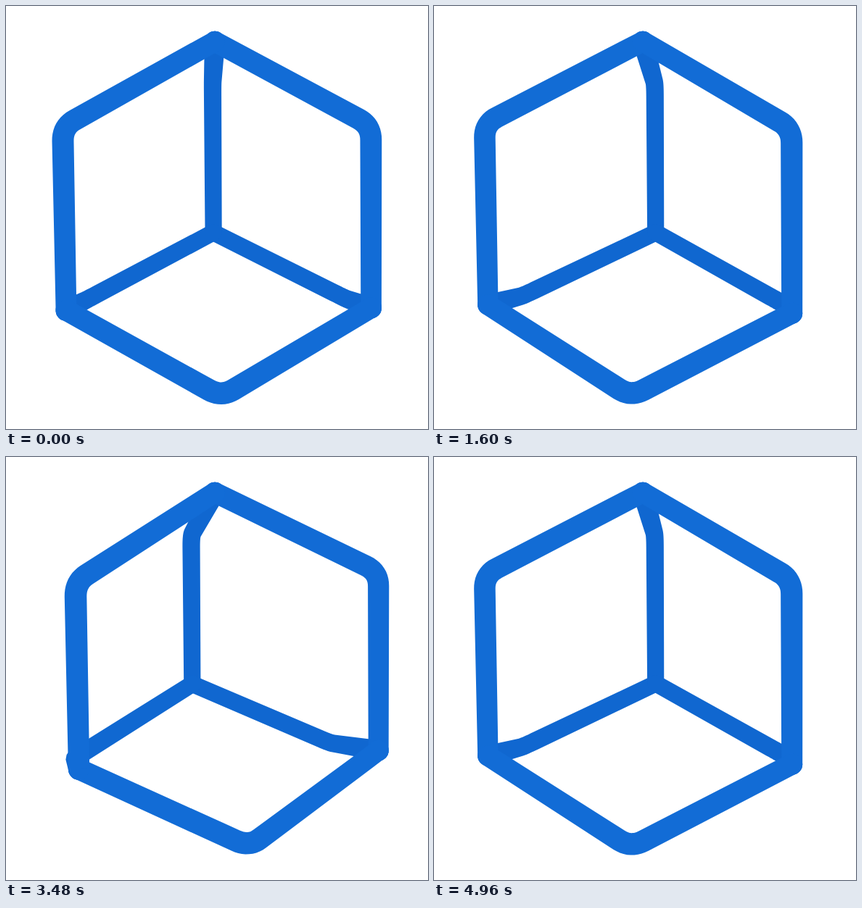
Recreate the animation shown at these times as an HTML page. Size 582 by 584 pixels, loop 5 s.

```html
<!DOCTYPE html>
<html lang="en">
<head>
<meta charset="utf-8">
<title>Rotating frame</title>
<style>
  html, body { margin: 0; width: 100%; height: 100%; overflow: hidden; background: #fff; }
  svg { display: block; width: 100vw; height: 100vh; }
</style>
</head>
<body>
<svg id="stage" viewBox="0 0 582 584"></svg>
<script>
const LOOP = 5000, STEP = 40, TURN = 360 / 126, PHASE = 1.3;   // degrees
const CX = 288, CY = 292, DIST = 1478, TILT = 16.1 * Math.PI / 180;
const SIN = Math.sin(TILT), COS = Math.cos(TILT);
const TOP = 241.5, LEAN = 0.009;   // the axis leans a little to the right below the apex
const RADIUS = 13.5, CUT = 18;

// Three points at equal angles, from the first angle, distance from the axis and height.
const ring = (deg, r, y) => [0, 120, 240].map(k => {
  const a = (deg + k) * Math.PI / 180;
  return [r * Math.cos(a), y, -r * Math.sin(a)];
});

const toward = (p, q, dist) => {
  const k = dist / Math.hypot(q[0] - p[0], q[1] - p[1], q[2] - p[2]);
  return p.map((v, i) => v + (q[i] - v) * k);
};

// Polyline from a to c with a rounded bend at b.
function bend(a, b, c) {
  const s = toward(b, a, CUT), e = toward(b, c, CUT), pts = [a];
  for (let i = 0; i <= 10; i++) {
    const t = i / 10, u = 1 - t;
    pts.push(b.map((v, j) => u * u * s[j] + 2 * u * t * v + t * t * e[j]));
  }
  pts.push(c);
  return pts;
}

const apex = [0, TOP, 0];
const shoulders = ring(89.8, 221, 150);
const feet = ring(90, 229, -91);
const corners = ring(149.8, 227, -162);

const stage = document.getElementById("stage");
const tubes = [];
for (let i = 0; i < 3; i++) {
  tubes.push(bend(apex, shoulders[i], feet[i]));
  tubes.push(bend(feet[i], corners[i], feet[(i + 1) % 3]));
}
const paths = tubes.map(() =>
  stage.appendChild(document.createElementNS("http://www.w3.org/2000/svg", "path")));

function project([x, y, z], c, s) {
  const px = x * c + z * s + (TOP - y) * LEAN, pz = z * c - x * s;
  const w = 1 - (pz * COS + y * SIN) / DIST;
  return { x: CX + px / w, y: CY + (pz * SIN - y * COS) / w, r: RADIUS / w, w };
}

const n2 = v => v.toFixed(2);

function disc({ x, y, r }) {
  const R = n2(r), d = n2(2 * r);
  return `M${n2(x - r)} ${n2(y)}a${R} ${R} 0 1 0 ${d} 0a${R} ${R} 0 1 0 -${d} 0z`;
}

// Closed outline around a projected polyline, with round ends.
function outline(pts) {
  const side = k => pts.map((p, i) => {
    const a = pts[Math.max(i - 1, 0)], b = pts[Math.min(i + 1, pts.length - 1)];
    const u = unit(a, p), v = unit(p, b);
    const tx = u[0] + v[0], ty = u[1] + v[1], len = Math.hypot(tx, ty) || 1;
    return n2(p.x - ty / len * p.r * k) + " " + n2(p.y + tx / len * p.r * k);
  });
  return "M" + side(1).concat(side(-1).reverse()).join("L") + "z" +
    disc(pts[0]) + disc(pts[pts.length - 1]);
}

function unit(a, b) {
  const dx = b.x - a.x, dy = b.y - a.y, len = Math.hypot(dx, dy) || 1;
  return [dx / len, dy / len];
}

// Slightly darker blue with distance.
function shade(w) {
  const k = Math.min(1, Math.max(0, (w - 0.9) / 0.2));
  return `rgb(${Math.round(18 - 2 * k)},${Math.round(108 - 5 * k)},${Math.round(214 - 6 * k)})`;
}

function draw(ms) {
  const a = (PHASE + Math.floor((ms % LOOP) / STEP) * TURN) * Math.PI / 180;
  const c = Math.cos(a), s = Math.sin(a);
  tubes
    .map(t => {
      const p = t.map(q => project(q, c, s));
      return { w: p.reduce((sum, q) => sum + q.w, 0) / p.length, d: outline(p) };
    })
    .sort((m, n) => n.w - m.w)
    .forEach((t, i) => {
      paths[i].setAttribute("d", t.d);
      paths[i].setAttribute("fill", shade(t.w));
    });
}

const start = performance.now();
function tick() {
  draw(performance.now() - start);
  requestAnimationFrame(tick);
}
tick();
</script>
</body>
</html>
```
